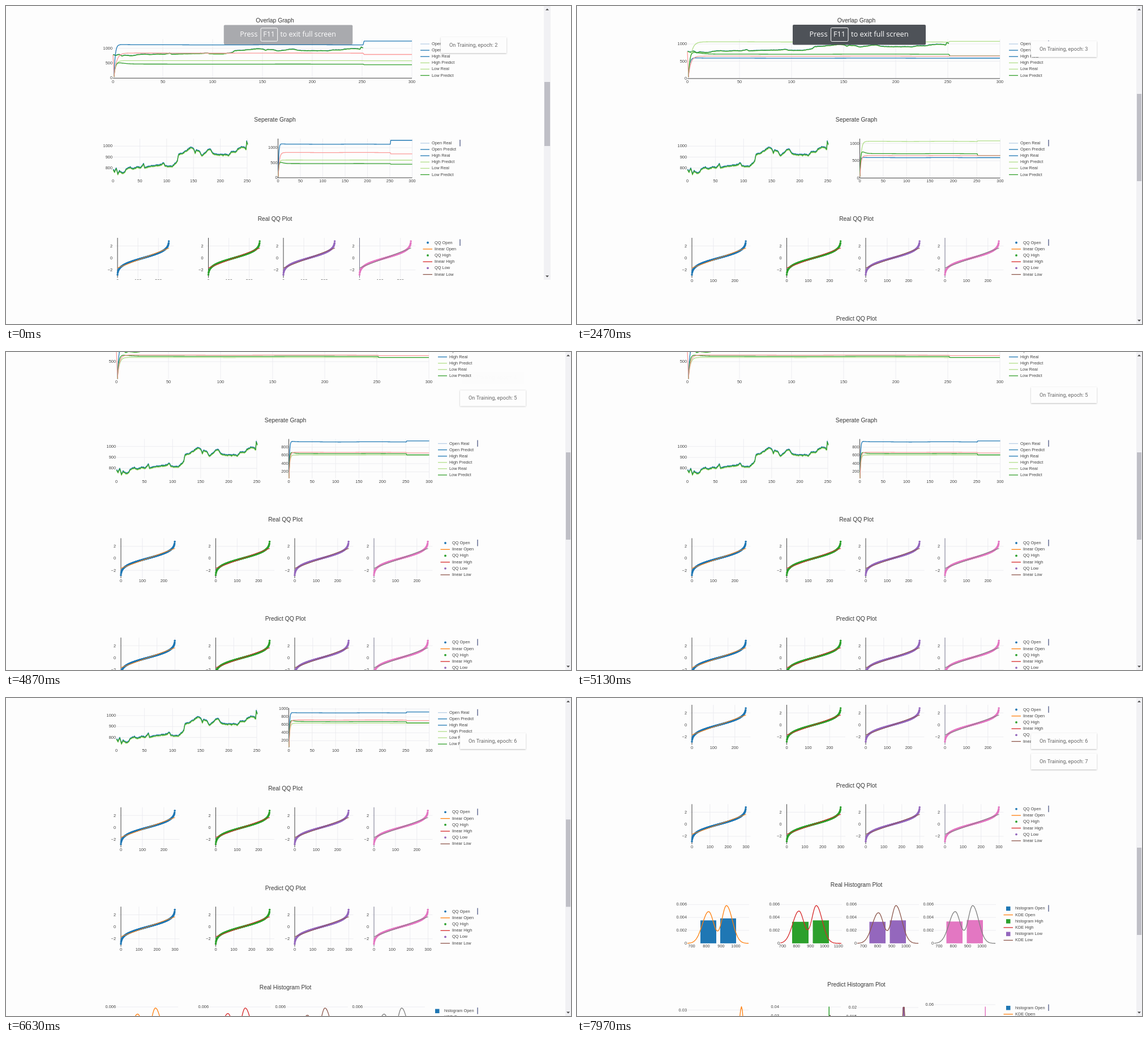
Animation, 998 px wide and 561 px high, one loop 8000 ms. Source, as an HTML page with a canvas:

```html
<!DOCTYPE html>
<html lang="en">
<head>
<meta charset="utf-8">
<title>Training dashboard</title>
<style>
html, body { margin: 0; width: 100%; height: 100%; overflow: hidden; background: #fdfdfd; }
canvas { display: block; }
</style>
</head>
<body>
<canvas id="stage" width="998" height="561"></canvas>
<script>
const ctx = document.getElementById('stage').getContext('2d');
const LOOP = 8000, FULLSCREEN_AT = 130, SANS = '"Liberation Sans", Arial, sans-serif';
const BLUE = '#1f78b4', LIME = '#b2df8a', GREEN = '#33a02c', PINK = '#fb9a99';
const MARKS = ['#1f77b4', '#2ca02c', '#9467bd', '#e377c2'];
const FITS = ['#ff7f0e', '#d62728', '#8c564b', '#7f7f7f'];
const GRID = '#e9e9ee', INK = '#444';

const WIDE = { mid: 493.5, over: [195, 747], left: [195, 443], right: [499.5, 747.5], qq: [203, 370.5, 510, 650],
  qqW: 95.5, legend: 763, toast: [802, 62], bar: [988, 998, 561, 155, 309] };
const NARROW = { mid: 475, over: [189, 717], left: [189, 426], right: [480.5, 717.5], qq: [197, 357.5, 490, 624.5],
  qqW: 91, legend: 732, toast: [768, 55], bar: [950, 962, 483, 134, 247] };

// time, scroll offset
const SCROLL = [[0, 0], [4560, 0], [4800, 80.5], [5280, 80.5], [5500, 155], [6480, 155], [6850, 305], [7620, 305], [7900, 397], [8000, 397]];
// time, opacity
const NOTICE = [[0, .48], [200, 1], [3900, 1], [4030, .3], [4130, 0], [8000, 0]];

// scales: [y at 500, pixels per 500]; lines: [color, level, level after 251, overshoot, rise]
const EPOCHS = [
  { n: 2, at: -999, over: [101, 26.3], right: [276.5, 26.5], step: 500,
    lines: [[BLUE, 1118, 1245, 10, 1.2], [LIME, 588, 585, 0, 1.8], [GREEN, 470, 450, 50, 1.2], [PINK, 840, 795, 0, 2.5]] },
  { n: 3, at: 1250, over: [97.5, 30.5], right: [273, 30.5], step: 500,
    lines: [[BLUE, 590, 590, 10, 1.2], [LIME, 1060, 1075, 0, 2.5], [GREEN, 705, 655, 60, 1.2], [PINK, 647, 648, 0, 2.2]] },
  { n: 4, at: 2915, over: [97.5, 31.7], right: [272.5, 32.5], step: 500,
    lines: [[BLUE, 846, 822, 0, 1.2], [LIME, 768, 768, 0, 1.8], [GREEN, 988, 1020, 75, 1.2], [PINK, 962, 985, 0, 2.2]] },
  { n: 5, at: 4580, over: [97.5, 33], right: [270.2, 36.25], step: 200,
    lines: [[BLUE, 930, 952, 15, 1.2], [LIME, 612, 612, 0, 1.8], [GREEN, 643, 613, 35, 1.2], [PINK, 675, 661, 0, 1.8]] },
  { n: 6, at: 6245, over: [97.5, 32], right: [270.5, 35], step: 200,
    lines: [[BLUE, 900, 925, 10, 1.2], [LIME, 640, 640, 0, 1.8], [GREEN, 680, 650, 35, 1.2], [PINK, 720, 705, 0, 1.8]] },
  { n: 7, at: 7850, over: [97.5, 32], right: [270.5, 35], step: 200,
    lines: [[BLUE, 900, 925, 10, 1.2], [LIME, 650, 650, 0, 1.8], [GREEN, 690, 660, 35, 1.2], [PINK, 740, 720, 0, 1.8]] }
];

// day, price
const PRICES = [[0, 785], [3, 765], [6, 798], [9, 742], [12, 772], [16, 757], [20, 752], [25, 788], [32, 806], [38, 790], [45, 810],
  [52, 802], [57, 840], [59, 802], [70, 815], [80, 822], [90, 830], [94, 848], [97, 815], [105, 818], [110, 812], [116, 842],
  [120, 862], [122, 922], [130, 936], [138, 962], [144, 984], [150, 978], [153, 936], [155, 962], [161, 953], [166, 908],
  [170, 930], [178, 968], [181, 974], [186, 932], [195, 922], [205, 918], [212, 926], [216, 915], [220, 948], [228, 945],
  [232, 968], [240, 995], [245, 986], [248, 972], [249, 1046], [251, 1020]];

function track(points, t) {
  const i = points.findIndex(p => p[0] >= t);
  if (i < 1) return points[i ? points.length - 1 : 0][1];
  const [a, va] = points[i - 1], [b, vb] = points[i];
  return va + (vb - va) * (t - a) / (b - a);
}
const easeOut = u => 1 - (1 - Math.min(1, Math.max(0, u))) ** 3;

let seed = 7;
const random = () => (seed = seed * 16807 % 2147483647) / 2147483647;
const realPrices = Array.from({ length: 252 }, (_, x) => track(PRICES, x) + (random() - .5) * 9);

function probit(p) {
  const q = Math.min(p, 1 - p), t = Math.sqrt(-2 * Math.log(q));
  const z = t - (2.515517 + .802853 * t + .010328 * t * t) / (1 + 1.432788 * t + .189269 * t * t + .001308 * t ** 3);
  return p < .5 ? -z : z;
}

function text(s, x, y, align = 'center', size = 7.4, color = INK, family = SANS) {
  ctx.font = `${size}px ${family}`;
  ctx.textAlign = align;
  ctx.textBaseline = 'middle';
  ctx.fillStyle = color;
  ctx.fillText(s, x, y);
}
function path(points, color, width = 1.3) {
  ctx.beginPath();
  points.forEach(p => ctx.lineTo(p[0], p[1]));
  ctx.strokeStyle = color;
  ctx.lineWidth = width;
  ctx.lineJoin = 'round';
  ctx.stroke();
}
const hline = (x0, x1, y, color = GRID, w = .8) => path([[x0, y], [x1, y]], color, w);
const vline = (x, y0, y1, color = GRID, w = .8) => path([[x, y0], [x, y1]], color, w);
const rect = (x0, y0, x1, y1, color) => { ctx.fillStyle = color; ctx.fillRect(x0, y0, x1 - x0, y1 - y0); };
const dot = (x, y, r) => { ctx.beginPath(); ctx.arc(x, y, r, 0, 7); ctx.fill(); };
const clipped = (x, y, w, h, draw) => {
  ctx.save(); ctx.beginPath(); ctx.rect(x, y, w, h); ctx.clip(); draw(); ctx.restore();
};

function xTicks(x0, x1, max, top, bottom) {
  for (let v = 0; v <= max; v += 50) {
    const x = x0 + (x1 - x0) * v / max;
    if (v) vline(x, top, bottom);
    text(v, x, bottom + 5.7);
  }
}
function legendBar(x, y) { rect(x + 69, y - 6, x + 71, y + 5.5, '#8a90ad'); }

function lineLegend(x, y) {
  const colors = ['#b9cfe6', BLUE, BLUE, LIME, LIME, GREEN];
  ['Open', 'High', 'Low'].forEach((name, i) => ['Real', 'Predict'].forEach((kind, j) => {
    const k = i * 2 + j, row = y + k * 11.1;
    hline(x, x + 16, row, colors[k], 1.3);
    text(name + ' ' + kind, x + 20, row, 'left');
  }));
  legendBar(x, y);
}
function pairLegend(x, y, marker, line, square) {
  ['Open', 'High', 'Low'].forEach((name, i) => {
    const row = y + i * 22.4, mx = x + (square ? -1 : 13), tx = x + (square ? 11 : 25);
    ctx.fillStyle = MARKS[i];
    if (square) ctx.fillRect(mx - 4, row - 3.5, 7.5, 7.5); else dot(mx, row, 1.9);
    hline(mx - 8.5, mx + 8, row + 11.3, FITS[i], 1.3);
    text(marker + ' ' + name, tx, row, 'left');
    text(line + ' ' + name, tx, row + 11.3, 'left');
  });
  legendBar(x, y);
}

function drawReal(x0, x1, span, yOf) {
  [[BLUE, 5], [LIME, -7], [GREEN, -1]].forEach(([color, shift]) =>
    path(realPrices.map((v, i) => [x0 + (x1 - x0) * i / span, yOf(v + shift)]), color));
}
function drawPredictions(epoch, x0, x1, yOf, start) {
  epoch.lines.forEach(([color, level, late, over, rise]) => {
    const points = [];
    for (let x = start; x <= 300; x += x < 30 ? .5 : 1) {
      const age = x - start, goal = x > 251.5 ? late : level * (1 + .003 * Math.sin(x / 23));
      const v = 40 + (goal - 40) * (1 - Math.exp(-age / rise)) + over * age / 4 * Math.exp(1 - age / 4);
      points.push([x0 + (x1 - x0) * x / 300, yOf(v)]);
    }
    path(points, color);
  });
}
function predictionAxes(epoch, [x0, x1], top, [y500, unit], step) {
  const bottom = top + 69.5, yOf = v => y500 - (v - 500) * unit / 500;
  xTicks(x0, x1, 300, top, bottom);
  for (let v = 0; v <= 1000; v += step) {
    const y = yOf(v);
    if (y > bottom + 1 || y < top) continue;
    hline(x0, x1, y, v ? GRID : INK, v ? .8 : 1);
    text(v, x0 - 1, y, 'right');
  }
  return yOf;
}

function overlapGraph(L, epoch) {
  const [x0, x1] = L.over, yOf = predictionAxes(epoch, L.over, 58.5, epoch.over, 500);
  clipped(x0 - 1, 57, x1 - x0 + 3, 72, () => {
    drawReal(x0, x1, 300, yOf);
    path([[x0, yOf(785)], [x0 + 2, yOf(45)]], PINK);
    drawPredictions(epoch, x0, x1, yOf, 1);
  });
  lineLegend(L.legend, 67);
}
function separateGraph(L, epoch) {
  const [a, b] = L.left, priceY = v => 247.2 + (1000 - v) * .193;
  xTicks(a, b, 250, 234, 303.5);
  [800, 900, 1000].forEach(v => { hline(a, b, priceY(v)); text(v, a - 1, priceY(v), 'right'); });
  drawReal(a, b, 250, priceY);
  const [x0, x1] = L.right, yOf = predictionAxes(epoch, L.right, 234, epoch.right, epoch.step);
  vline(x0, 234, 303.5, INK, 1);
  clipped(x0 - 1, 233, x1 - x0 + 3, 71, () => drawPredictions(epoch, x0, x1, yOf, .5));
  lineLegend(L.legend, 242);
}
function qqPlots(L, y, count) {
  const zero = y + 68, yOf = z => zero - z * 10.6, unit = L.qqW / count;
  L.qq.forEach((x0, k) => {
    [2, 0, -2].forEach(z => {
      if (z) hline(x0 - 4, x0 + L.qqW + 8, yOf(z));
      text(z < 0 ? '−2' : z, x0 - 9, yOf(z) + .4, 'right');
    });
    for (let v = 0; v <= count; v += 100) {
      if (v) vline(x0 + v * unit, y + 32.5, y + 103);
      text(v, x0 + v * unit, y + 108);
    }
    vline(x0, y + 32.5, y + 103, k === 3 ? '#77778c' : INK, 1);
    ctx.fillStyle = MARKS[k];
    for (let i = 0; i < count; i++) dot(x0 + i * unit, yOf(probit((i + .6825) / (count + .365))), 1.8);
    path([[x0, yOf(-1.65)], [x0 + L.qqW, yOf(1.65)]], FITS[k], 1.1);
  });
  pairLegend(L.legend, y + 41, 'QQ', 'linear');
}

// first tick x, pixels per 100, tick count, bar edges and tops, peaks
const HISTOGRAMS = [
  { x: 202.5, d: 26, n: 4, bars: [[218, 246, 40.5], [253, 281, 44]], peaks: [[232.5, 56], [264, 66.5]], label: 194 },
  { x: 363, d: 24.7, n: 5, bars: [[380, 409, 38], [416.5, 445, 40.5]], peaks: [[392, 57], [422.7, 66.5]], label: 358 },
  { x: 506, d: 25, n: 4, bars: [[516.5, 545, 38], [552.5, 581, 40.5]], peaks: [[532.5, 54], [563.5, 66.5]], label: 494 },
  { x: 639.5, d: 25.2, n: 4, bars: [[652.5, 681, 38.5], [688.5, 717, 41]], peaks: [[668, 56], [699, 66.5]], label: 630 }
];
function realHistograms(L, y) {
  const base = y + 102.5;
  HISTOGRAMS.forEach((h, k) => {
    const start = h.label + 1, end = h.label + 110;
    for (let i = 0; i < 4; i++) {
      const row = base - i * 22.85;
      if (i) hline(start, end, row);
      text(i ? '0.00' + i * 2 : 0, h.label, row, 'right');
    }
    for (let i = 0; i < h.n; i++) text(700 + i * 100, h.x + i * h.d, base + 5.5);
    h.bars.forEach(([a, b, top]) => rect(a, base - top, b, base, MARKS[k]));
    const [[p, hp], [q, hq]] = h.peaks, bell = (x, s) => Math.exp(-x * x / (2 * s * s)), curve = [];
    for (let x = start; x <= end - 1; x++)
      curve.push([x, base - hp * bell(x - p, x < p ? 11 : 9) - hq * bell(x - q, x < q ? 8 : 10.5)]);
    path(curve, FITS[k]);
  });
  pairLegend(L.legend, y + 41, 'histogram', 'KDE', true);
}
function predictedHistograms(L, y) {
  const labels = [['0.03', 194, 45], ['0.04', 357, 39.5], ['0.03', 357, 55.5], ['0.02', 494, 40.5], ['0.015', 494, 56], ['0.06', 630, 35.5]];
  labels.forEach(([s, x, dy]) => { hline(x + 1, x + 109, y + dy); text(s, x, y + dy, 'right'); });
  rect(444.5, y + 39, 446, y + 100, MARKS[1]);
  rect(446, y + 54, 448, y + 100, '#5b4a3a');
  rect(575, y + 40, 579, y + 100, MARKS[2]);
  rect(720.5, y + 39, 722, y + 100, MARKS[3]);
  path([[286, y + 70], [289, y + 45], [290.5, y + 39], [292, y + 45], [294, y + 70]], FITS[0]);
  path([[574, y + 70], [576.5, y + 40], [578, y + 40], [580, y + 70]], FITS[2]);
  pairLegend(L.legend, y + 41, 'histogram', 'KDE', true);
}

function scrollbar([x0, x1, height, top, bottom], scroll) {
  const mid = (x0 + x1) / 2, shift = scroll * .2746;
  rect(x0, 0, x1, height, '#f1f1f4');
  rect(x0 + 1, top + shift, x1 - 1, bottom + shift, '#bfbfc6');
  [[6, -1], [height - 6, 1]].forEach(([y, dir]) => {
    ctx.fillStyle = '#444';
    ctx.beginPath();
    ctx.moveTo(mid - 3, y - dir * 1.5); ctx.lineTo(mid + 3, y - dir * 1.5); ctx.lineTo(mid, y + dir * 1.5);
    ctx.fill();
  });
}

function notice(t) {
  const alpha = track(NOTICE, t), scale = Math.min(1, .968 + t / 5000);
  if (!alpha) return;
  ctx.save();
  ctx.translate(498.5, 51);
  ctx.scale(scale, scale);
  ctx.globalAlpha = alpha * .96;
  ctx.fillStyle = '#474b52';
  ctx.beginPath(); ctx.roundRect(-117.5, -18, 235, 35.5, 2); ctx.fill();
  ctx.globalAlpha = Math.min(1, alpha * 2.5);
  const font = '"Open Sans", sans-serif';
  text('Press', -88, 0, 'left', 12.8, '#fff', font);
  text('F11', -35, 0, 'center', 12.8, '#fff', font);
  text('to exit full screen', -14.5, 0, 'left', 12.8, '#fff', font);
  ctx.strokeStyle = '#fff';
  ctx.lineWidth = 1;
  ctx.beginPath(); ctx.roundRect(-50, -12.5, 30.5, 24, 2); ctx.stroke();
  ctx.restore();
}

function toast(x, y, n, alpha) {
  ctx.save();
  ctx.globalAlpha = alpha;
  ctx.shadowColor = 'rgba(0,0,0,.25)';
  ctx.shadowBlur = 2.5;
  ctx.shadowOffsetY = .7;
  rect(x, y, x + 116, y + 28, '#fdfdfd');
  ctx.shadowColor = 'transparent';
  text('On Training, epoch: ' + n, x + 15, y + 14, 'left', 9.2, '#666', 'Roboto, sans-serif');
  ctx.restore();
}
function toasts(t, [x, y], index) {
  const age = t - EPOCHS[index].at, leave = easeOut((age - 200) / 240);
  if (age >= 440) return toast(x, y, EPOCHS[index].n, 1);
  const enter = easeOut(age / 100);
  toast(x, y - 40 * leave, EPOCHS[index - 1].n, Math.max(0, 1 - leave * 1.3));
  toast(x, Math.max(y, y + 36 - 40 * leave + 18 * (1 - enter)), EPOCHS[index].n, enter);
}

function draw(t) {
  const L = t < FULLSCREEN_AT ? NARROW : WIDE, scroll = track(SCROLL, t);
  const index = EPOCHS.findLastIndex(e => e.at <= t), epoch = EPOCHS[index];
  rect(0, 0, 998, 561, '#fdfdfd');
  clipped(0, 0, L.bar[1], L.bar[2], () => {
    ctx.save();
    ctx.translate(0, -scroll);
    ['Overlap Graph', 'Seperate Graph', 'Real QQ Plot', 'Predict QQ Plot', 'Real Histogram Plot', 'Predict Histogram Plot']
      .forEach((s, i) => text(s, L.mid, 25.8 + i * 175.4, 'center', 10.3, '#383838'));
    overlapGraph(L, epoch);
    separateGraph(L, epoch);
    qqPlots(L, 376.5, 252);
    qqPlots(L, 551.8, 300);
    realHistograms(L, 727.3);
    predictedHistograms(L, 902.5);
    ctx.restore();
    scrollbar(L.bar, scroll);
  });
  notice(t);
  toasts(t, L.toast, index);
}

const began = performance.now();
function tick() {
  draw((performance.now() - began) % LOOP);
  requestAnimationFrame(tick);
}
tick();
</script>
</body>
</html>
```
